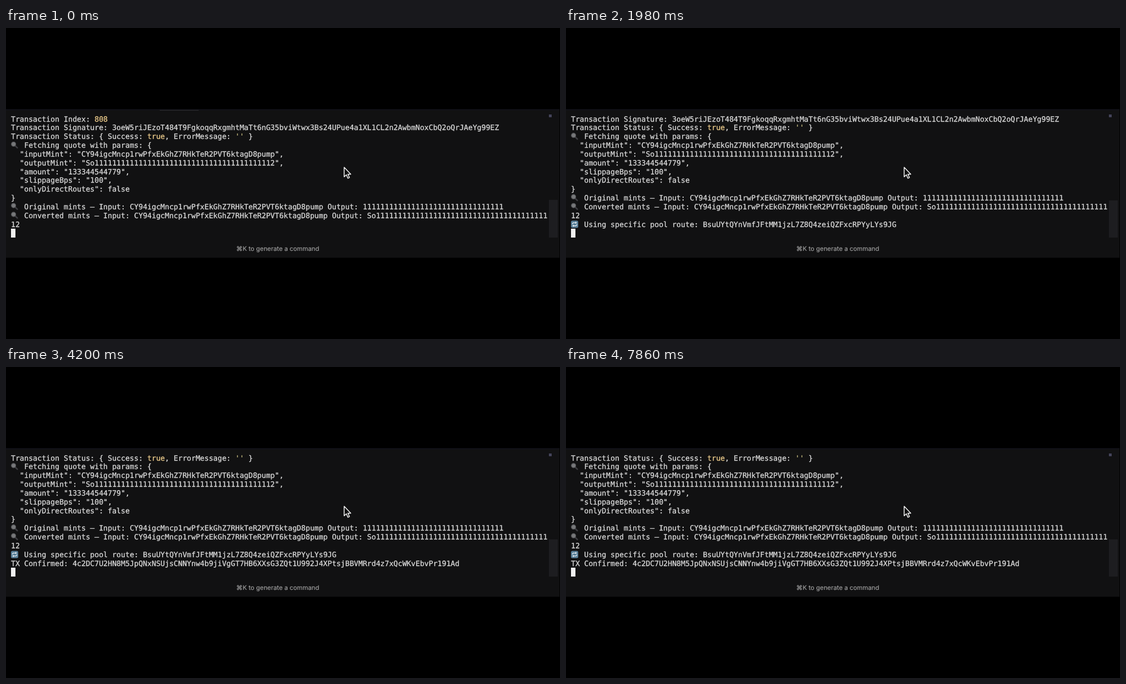
An HTML page that plays this animation: 998x561 px, repeating every 8000 ms.

```html
<!DOCTYPE html>
<html lang="en">
<head>
<meta charset="utf-8">
<title>Terminal</title>
<style>
  html, body { margin: 0; width: 100%; height: 100%; overflow: hidden; background: #000; }
  svg { display: block; width: 998px; height: 561px; }
  text { white-space: pre; text-rendering: geometricPrecision; }
  #log { font: 13.17px "DejaVu Sans Mono", monospace; }
  #log text { fill: #dadada; stroke: #dadada; stroke-width: .3px; }
  #log .num { fill: #eccb8b; stroke: #eccb8b; }
  #log .str { fill: #c2b87c; stroke: #c2b87c; }
  #hint { font: 11.35px Inter, sans-serif; fill: #a0a0a0; stroke: #a0a0a0; stroke-width: .15px; }
</style>
</head>
<body>
<svg viewBox="0 0 998 561">
  <defs>
    <g id="lens">
      <path d="M5.5 5.5 11.4 11.2" stroke="#3c3c40" stroke-width="2.6" stroke-linecap="round"/>
      <circle cx="4.6" cy="4.6" r="4" fill="#77787a" stroke="#505154" stroke-width="1.2"/>
    </g>
    <g id="repeat">
      <rect width="13" height="13" rx="2.5" fill="#587f98"/>
      <path d="M2.8 6.4V5.2q0-1.4 1.4-1.4h4.6M10.2 6.6v1.2q0 1.4-1.4 1.4H4.2" fill="none" stroke="#e8eef2" stroke-width="1.3"/>
      <path d="M8 1.8 10.8 3.8 8 5.8zM5 7.2 2.2 9.2 5 11.2z" fill="#e8eef2"/>
    </g>
  </defs>
  <rect width="998" height="561"/>
  <rect y="146.5" width="997" height="268" fill="#111112"/>
  <rect y="147" width="997" height="1" fill="#15151f"/>
  <rect id="underline" x="277" y="148" width="70" height="1" fill="#2b2b2d"/>
  <rect x="978" y="156" width="5" height="5" fill="#44445a"/>
  <rect id="thumb" x="978" y="310" width="16" height="68" fill="#1d1d20"/>
  <g id="log"></g>
  <rect x="9" y="362" width="8" height="16" fill="#f0f0f0"/>
  <path d="M609.2 251.2v17.2l3.9-3.7 2.9 6.4 2.7-1.2-2.8-6.2h5.2z" fill="#101010" stroke="#f2f2f2" stroke-width="1.5" stroke-linejoin="round"/>
  <text id="hint" x="414.8" y="402">⌘K to generate a command</text>
</svg>
<script>
const LOOP = 8000, LEFT = 9, CELL = 7.929, BASE = 168.6, PITCH = 15.83, ROWS = 13;
const SCROLLS = [1200, 2500];
const MINT = 'CY94igcMncp1rwPfxEkGhZ7RHkTeR2PVT6ktagD8pump';
const ones = n => '1'.repeat(n);

// [text, icon]; {n:…} and {s:…} mark coloured values
const lines = [
  ['Transaction Index: {n:808}'],
  ['Transaction Signature: 3oeW5riJEzoT484T9FgkoqqRxgmhtMaTt6nG35bviWtwx3Bs24UPue4a1XL1CL2n2AwbmNoxCbQ2oQrJAeYg99EZ'],
  ["Transaction Status: { Success: {n:true}, ErrorMessage: {s:''} }"],
  ['Fetching quote with params: {', 'lens'],
  [`  "inputMint": "${MINT}",`],
  [`  "outputMint": "So${ones(40)}2",`],
  ['  "amount": "133344544779",'],
  ['  "slippageBps": "100",'],
  ['  "onlyDirectRoutes": false'],
  ['}'],
  [`Original mints – Input: ${MINT} Output: ${ones(32)}`, 'lens'],
  [`Converted mints – Input: ${MINT} Output: So${ones(39)}`, 'lens'],
  ['12'],
  ['Using specific pool route: BsuUYtQYnVmfJFtMM1jzL7Z8Q4zeiQZFxcRPYyLYs9JG', 'repeat'],
  ['TX Confirmed: 4c2DC7U2HN8M5JpQNxNSUjsCNNYnw4b9jiVgGT7HB6XXsG3ZQt1U992J4XPtsjBBVMRrd4z7xQcWKvEbvPr191Ad']
];

const $ = id => document.getElementById(id);
function add(parent, tag, attrs, text = '') {
  const el = document.createElementNS('http://www.w3.org/2000/svg', tag);
  for (const key in attrs) el.setAttribute(key, attrs[key]);
  el.textContent = text;
  return parent.appendChild(el);
}

const rows = lines.map(([text, icon]) => {
  const row = add($('log'), 'g', {});
  if (icon) add(row, 'use', { href: '#' + icon, x: LEFT, y: icon === 'lens' ? -11.2 : -11 });
  const label = add(row, 'text', { x: LEFT + (icon ? 3 * CELL : 0) });
  text.split(/(\{[ns]:[^}]*\})/).forEach(part => {
    const mark = part.match(/^\{([ns]):(.*)\}$/);
    if (mark) add(label, 'tspan', { class: mark[1] === 'n' ? 'num' : 'str' }, mark[2]);
    else add(label, 'tspan', {}, part);
  });
  return row;
});

let shown = -1;
function draw(now) {
  const t = now % LOOP;
  const offset = SCROLLS.filter(at => t >= at).length;
  if (offset !== shown) {
    shown = offset;
    rows.forEach((row, i) => {
      const pos = i - offset;
      row.style.display = pos >= 0 && pos < ROWS ? '' : 'none';
      row.setAttribute('transform', `translate(0 ${BASE + pos * PITCH})`);
    });
    $('thumb').setAttribute('y', offset ? 311 : 310);
    $('thumb').setAttribute('height', offset ? 67 : 68);
    $('underline').style.display = offset ? 'none' : '';
  }
}
const start = performance.now();
function tick() {
  draw(performance.now() - start);
  requestAnimationFrame(tick);
}
tick();
</script>
</body>
</html>
```
